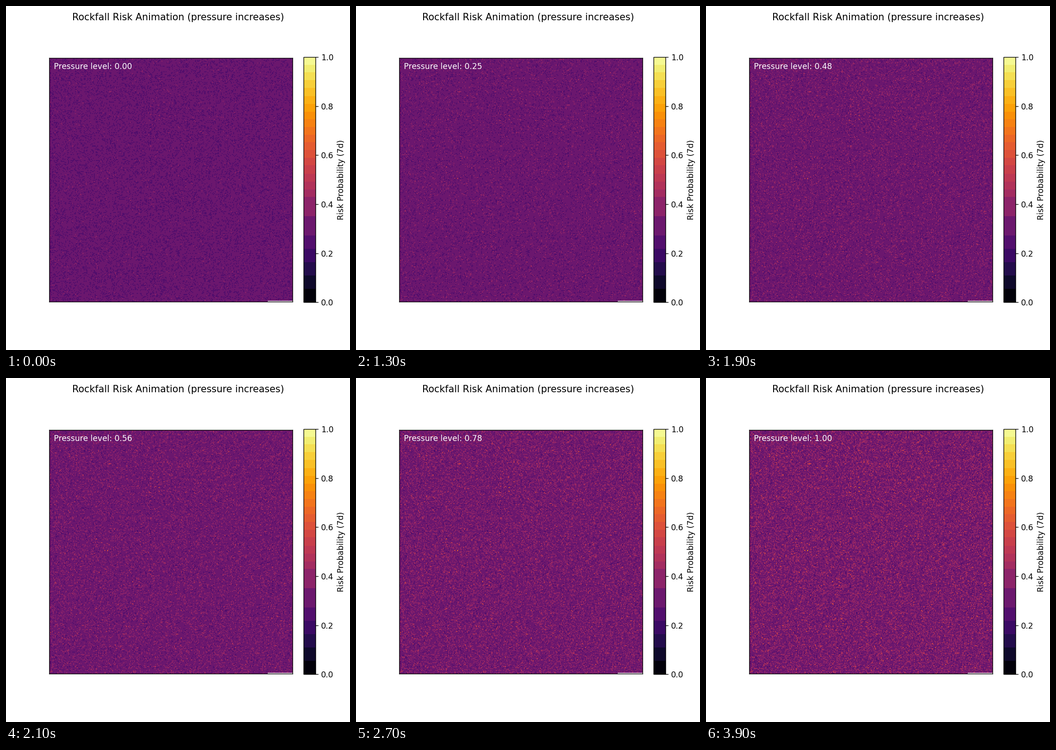
Animation of 748 by 748 pixels, one loop 4000 ms. Source, as a matplotlib script:

```python
import numpy as np
import matplotlib.pyplot as plt
from matplotlib.animation import FuncAnimation
from matplotlib.colors import ListedColormap

SIZE, INCHES = 748, 6
FRAMES, INTERVAL = 40, 100
CELLS = 256


def banded_cmap(levels=256):
    """Inferno reduced to flat bands, broad when dark and narrow when bright."""
    edges = np.concatenate([np.linspace(0, 0.275, 6),
                            np.linspace(0.275, 0.43, 3)[1:],
                            np.linspace(0.43, 1, 19)[1:]])
    tones = edges[:-1] + 0.35 * np.diff(edges)
    values = (np.arange(levels) + 0.5) / levels
    band = np.searchsorted(edges, values) - 1
    return ListedColormap(plt.get_cmap("inferno")(tones[band]))


def make_rock():
    """Right-skewed weakness of every cell, with a few very weak spots."""
    rock = np.random.default_rng(42).gamma(4, 1, (CELLS, CELLS))
    rock = np.minimum(rock, 15)
    for col, row, weakness in [(61, 126, 20), (58, 126, 16), (115, 60, 18)]:
        rock[row, col] = weakness
    return rock


def pressure_at(frame):
    return 0.5 * (1 - np.cos(np.pi * frame / (FRAMES - 1)))


def risk_at(pressure):
    floor = 0.248 - 0.012 * pressure
    gain = 0.0105 + 0.0167 * pressure
    return np.clip(floor + gain * rock, 0, 1)


rock = make_rock()

plt.rcParams["font.family"] = "DejaVu Sans"
fig, ax = plt.subplots(figsize=(INCHES, INCHES), dpi=SIZE / INCHES)
fig.suptitle("Rockfall Risk Animation (pressure increases)")

field = ax.imshow(risk_at(0), cmap=banded_cmap(), vmin=0, vmax=1,
                  interpolation="nearest")
ax.set(xticks=[], yticks=[])
ax.plot([0.9, 1], [0.002, 0.002], color="white", lw=1, transform=ax.transAxes)
label = ax.text(0.02, 0.98, "", color="white", va="top",
                transform=ax.transAxes)
fig.colorbar(field, ax=ax, fraction=0.046, pad=0.04,
             label="Risk Probability (7d)")


def update(frame):
    pressure = pressure_at(frame)
    field.set_data(risk_at(pressure))
    label.set_text(f"Pressure level: {pressure:.2f}")
    return field, label


anim = FuncAnimation(fig, update, frames=FRAMES, interval=INTERVAL,
                     repeat=True, repeat_delay=0)
plt.show()
```
